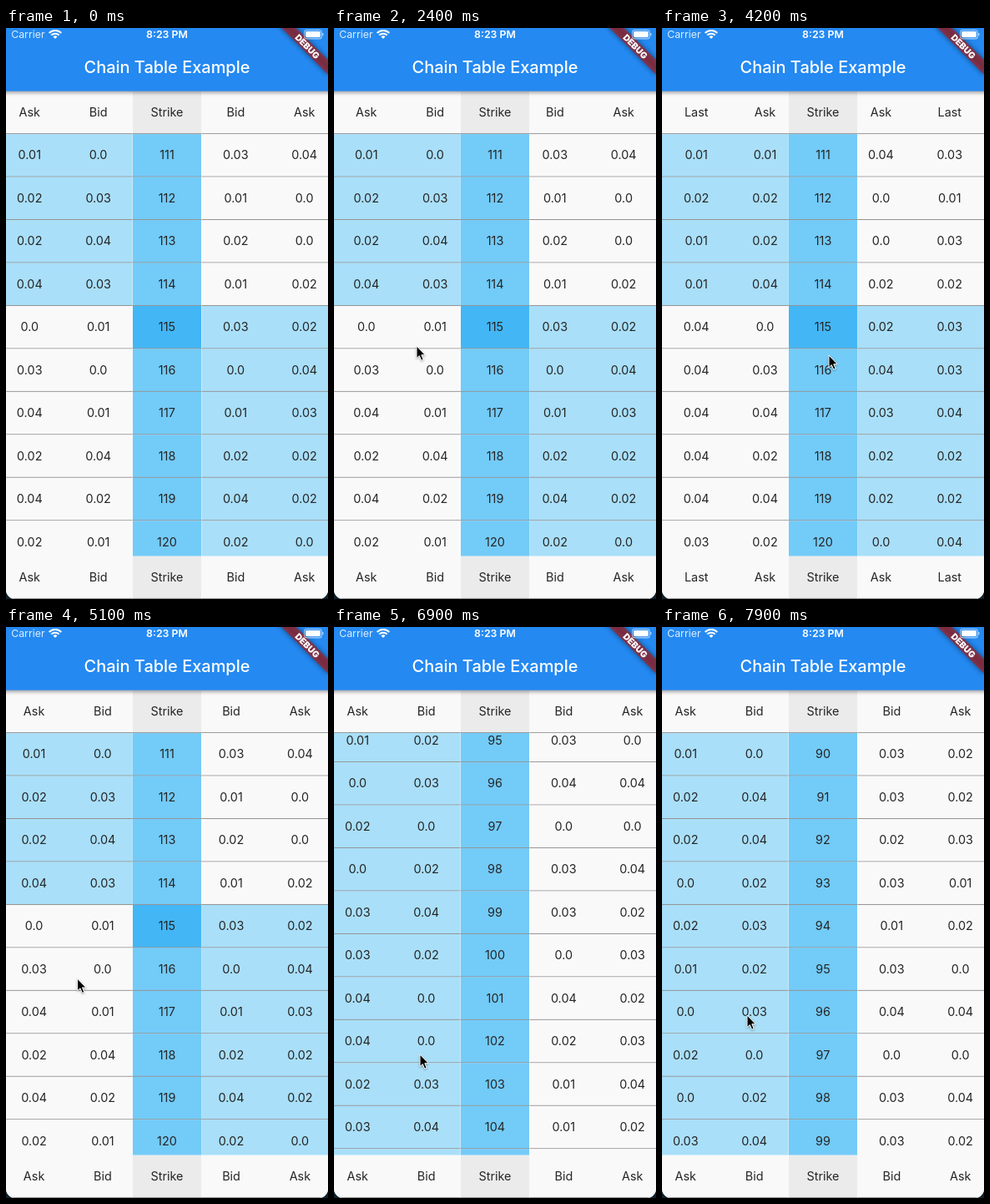
Write an HTML page that moves like this. It is 386 by 684 pixels and loops after 8000 ms.

```html
<!DOCTYPE html>
<html lang="en">
<head>
<meta charset="utf-8">
<title>Chain table</title>
<style>
  html, body { margin: 0; width: 100%; height: 100%; overflow: hidden; background: #10222c; }
  #stage { display: block; width: 386px; height: 684px; background: #f9f9f9; border-radius: 0 0 11px 11px; }
  text { font: 14px Inter, "Open Sans", sans-serif; fill: #252525; text-anchor: middle; }
  .bar { filter: drop-shadow(0 2px 2px rgba(0, 0, 0, .36)); }
  .title { font-size: 19.4px; font-weight: 500; fill: #fff; }
  .status { font-size: 12px; fill: #fff; }
  .debug { font-size: 10.2px; font-weight: 900; fill: #fff; }
</style>
</head>
<body>
<svg id="stage" viewBox="0 0 386 684">
  <!-- 375 x 667 point screen, top edge slightly cropped -->
  <g transform="scale(1.0293) translate(0 -2.5)">
    <g id="table"></g>
    <rect class="bar" x="-8" width="391" height="76" fill="#2489f1"/>
    <text class="title" x="187.5" y="55">Chain Table Example</text>
    <g transform="translate(375 0) rotate(45)">
      <rect x="-40" y="28" width="80" height="12" fill="#000" opacity=".5" style="filter: blur(3px)"/>
      <rect x="-40" y="28" width="80" height="12" fill="#b71c1c" fill-opacity=".63"/>
      <text class="debug" y="37.7">DEBUG</text>
    </g>
    <text class="status" x="6" y="14.3" style="text-anchor: start" opacity=".85">Carrier</text>
    <text class="status" x="187.5" y="14.3" style="font-weight: 600">8:23 PM</text>
    <g fill="none" stroke="#fff" stroke-width="2">
      <path d="M50.2 8.4a10 10 0 0 1 14.2 0M52.7 10.9a6.5 6.5 0 0 1 9.2 0"/>
      <path d="M57.3 15.2l-2.4-2.4a3.4 3.4 0 0 1 4.8 0z" fill="#fff" stroke="none"/>
      <rect x="347.5" y="5" width="20" height="10" rx="2.6" stroke-width="1" stroke-opacity=".6"/>
      <rect x="349" y="6.5" width="17" height="7" rx="1.4" fill="#fff" stroke="none"/>
      <path d="M369 8.4v3.2" stroke-width="1.2" stroke-opacity=".7"/>
    </g>
  </g>
  <path id="cursor" d="M0 0V14.6L3.3 11.6L5.7 17.2L8.2 16.1L5.8 10.7H10.3Z" fill="#000" stroke="#fff"
        stroke-width="1" stroke-linejoin="round" style="filter: drop-shadow(0 1px 1px rgba(0, 0, 0, .35))"/>
</svg>
<script>
const LOOP = 8000, STEP = 100;
const COL = 80, ROW = 50, FIRST = 90, LAST = 120, TOP = 111, MONEY = 115;

// Prices in cents, one digit per strike, ending at strike 120
const calls = {
  Last: '1211444443',
  Ask: '1220210203344232014301224034242',
  Bid: '0442323024200341302240343101421'
};
const puts = {
  Bid: '3323134033042114203123121301242',
  Ask: '2231204042323420341204002243220',
  Last: '3132334224'
};
const strikes = { Strike: null };

const NS = 'http://www.w3.org/2000/svg';
function add(parent, tag, attrs = {}, label) {
  const el = parent.appendChild(document.createElementNS(NS, tag));
  for (const k in attrs) el.setAttribute(k, attrs[k]);
  if (label !== undefined) el.textContent = label;
  return el;
}

const price = d => d > 0 ? '0.0' + d : '0.0';

function line(parent, labels, y, fill) {
  const width = labels.length * COL;
  add(parent, 'rect', { y, width, height: ROW, fill });
  add(parent, 'rect', { y: y + ROW - 1, width, height: 1, fill: '#949494' });
  labels.forEach((s, i) => add(parent, 'text', { x: (i + .5) * COL, y: y + 29.5 }, s));
}

function pane(x, width, columns, head, fill) {
  const clip = add(table, 'svg', { x, y: 76, width, height: 591 });
  const slide = add(clip, 'g');
  const names = Object.keys(columns);
  line(slide, names, 0, head);
  line(slide, names, 541, head);
  const body = add(slide, 'svg', { y: 50, width: names.length * COL, height: 491 });
  const rows = add(body, 'g');
  for (let n = FIRST; n <= LAST; n++) {
    const cells = names.map(k => {
      const col = columns[k];
      return col ? price(col[col.length - 1 - LAST + n]) : n;
    });
    line(rows, cells, (n - TOP) * ROW, fill(n));
  }
  return { slide, rows };
}

const table = document.getElementById('table');
const cursor = document.getElementById('cursor');
const PLAIN = '#f9f9f9', ITM = '#a9dff9';
const left = pane(0, 147.5, calls, PLAIN, n => n < MONEY ? ITM : PLAIN);
const right = pane(227.5, 147.5, puts, PLAIN, n => n < MONEY ? PLAIN : ITM);
const mid = pane(147.5, COL, strikes, '#ebebeb', n => n === MONEY ? '#43b6f5' : '#73cbf8');

// Keys: time, value(s)
const slideKeys = [[2200, 0], [2400, 10.2], [2800, 92.5], [3050, 114], [3300, 107], [3700, 92.5], [4500, 92.5], [5200, 0]];
const scrollKeys = [[6100, 0], [6400, 170], [6900, 784], [7400, 1050]];
const cursorKeys = [
  [900, 40, 690], [1800, 86, 382], [2200, 86, 381], [2400, 99, 381], [2900, 225, 377], [3300, 256, 375],
  [4200, 200, 392], [4500, 192, 396], [5200, 80, 425], [6000, 122, 447], [6400, 106, 540],
  [6900, 103, 512], [7200, 102, 480], [7900, 102, 465]
];

// Monotone cubic through the keys
function track(keys, t, k = 1) {
  const i = keys.findIndex(p => p[0] > t);
  if (i < 0) return keys[keys.length - 1][k];
  if (!i) return keys[0][k];
  const rate = j => (keys[j][k] - keys[j - 1][k]) / (keys[j][0] - keys[j - 1][0]);
  const slope = j => {
    if (!j || j === keys.length - 1) return 0;
    const a = rate(j), b = rate(j + 1);
    return a * b > 0 ? 2 * a * b / (a + b) : 0;
  };
  const [p, q] = [keys[i - 1], keys[i]];
  const span = q[0] - p[0], u = (t - p[0]) / span, v = 1 - u;
  return p[k] * v * v * (1 + 2 * u) + q[k] * u * u * (3 - 2 * u)
    + span * u * v * (slope(i - 1) * v - slope(i) * u);
}

const move = (el, x, y) => el.setAttribute('transform', `translate(${x} ${y})`);

function draw(now) {
  const t = Math.floor(now % LOOP / STEP) * STEP;
  const shift = track(slideKeys, t), scroll = track(scrollKeys, t);
  move(left.slide, shift - 92.5, 0);
  move(right.slide, -shift, 0);
  for (const p of [left, mid, right]) move(p.rows, 0, scroll);
  cursor.style.display = t < 900 ? 'none' : '';
  move(cursor, track(cursorKeys, t, 1), track(cursorKeys, t, 2));
}

let start;
function tick(now) {
  start ??= now;
  draw(now - start);
  requestAnimationFrame(tick);
}
draw(0);
requestAnimationFrame(tick);
</script>
</body>
</html>
```
